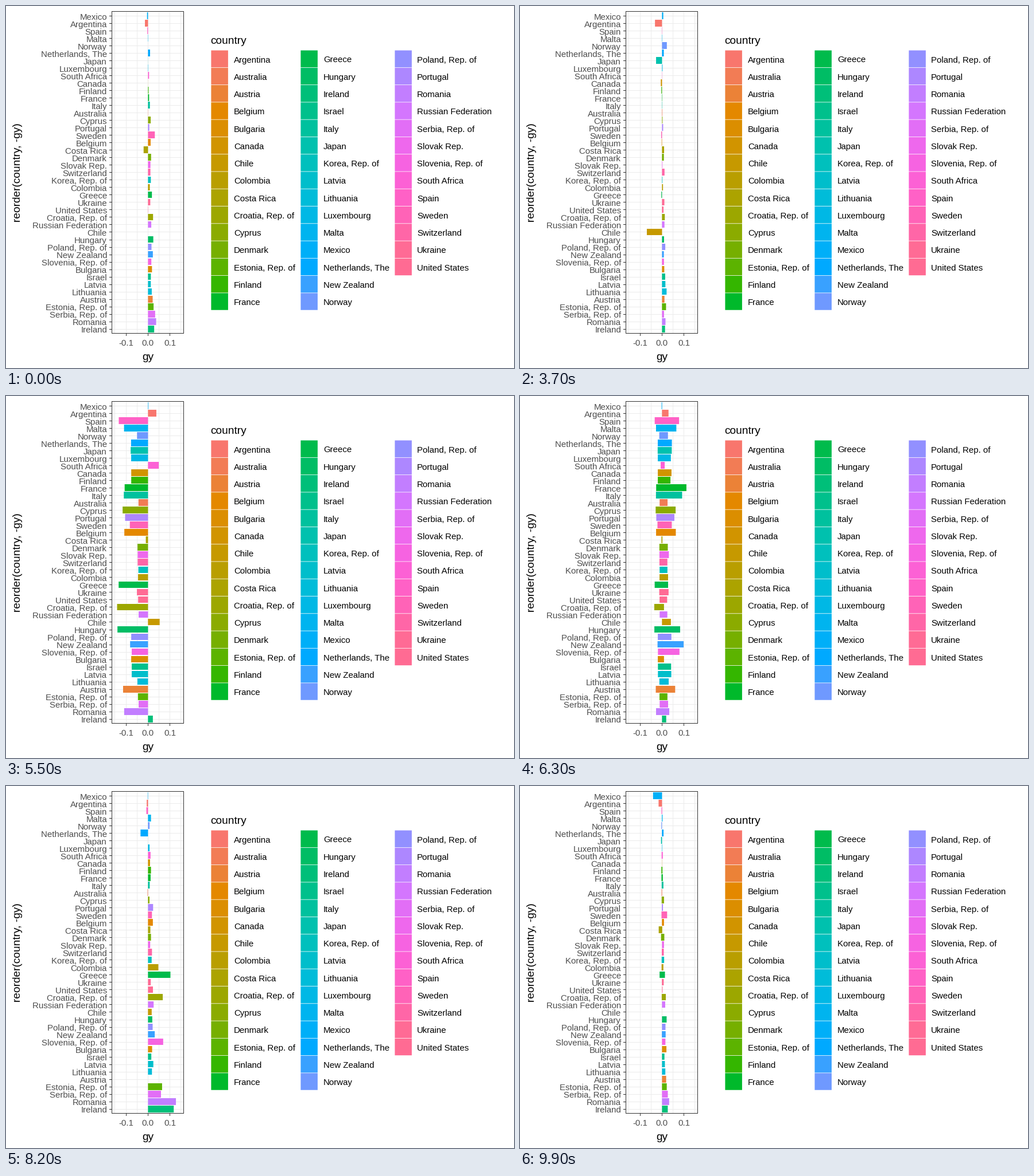
Animation of 885x632 px, one loop 10000 ms. Source, as a matplotlib script:

```python
import numpy as np
import matplotlib.pyplot as plt
from matplotlib.animation import FuncAnimation
from matplotlib.collections import LineCollection, PolyCollection
from matplotlib.patches import Rectangle

W, H, DPI = 885, 632, 100
FRAMES, INTERVAL = 100, 100
LEFT, RIGHT, TOP, BOTTOM = 184.5, 309.5, 9.5, 571.5
ZERO, SCALE = 247.4, 0.383          # pixels; pixels per 0.001 of growth
ROW0, ROW_STEP, BAR_HALF = 17.5, 13.017, 5.86
KEY_TOP, KEY_STEP = 77, 30.27
INK, AXIS_INK, GRID, BORDER = "black", "#4D4D4D", "#EBEBEB", "#333333"

countries = """Mexico|Argentina|Spain|Malta|Norway|Netherlands, The|Japan|Luxembourg
South Africa|Canada|Finland|France|Italy|Australia|Cyprus|Portugal|Sweden|Belgium
Costa Rica|Denmark|Slovak Rep.|Switzerland|Korea, Rep. of|Colombia|Greece|Ukraine
United States|Croatia, Rep. of|Russian Federation|Chile|Hungary|Poland, Rep. of
New Zealand|Slovenia, Rep. of|Bulgaria|Israel|Latvia|Lithuania|Austria
Estonia, Rep. of|Serbia, Rep. of|Romania|Ireland""".replace("\n", "|").split("|")
names = sorted(countries)
N = len(countries)
rng = np.random.default_rng(4)


def quarter(base, spread=4, **notable):
    """Growth in thousandths: a base with noise, and a few countries that stand out."""
    values = base + rng.normal(0, spread, N)
    for i, name in enumerate(countries):
        key = name.split(",")[0].replace(" ", "")
        values[i] = notable.get(key, values[i])
    return values


def trend(top, bottom):
    return np.linspace(top, bottom, N)


# The slump comes in four depths.
deepest = "Spain Greece Croatia Hungary"
deep = "Malta France Italy Cyprus Portugal Belgium Austria Romania"
mild = """Norway Australia Denmark Slovak Switzerland Korea Colombia Ukraine United
Russian Lithuania Estonia Serbia"""


def depth(name):
    first = name.replace(",", "").split()[0]
    for group, value in ((deepest, -138), (deep, -111), (mild, -45)):
        if first in group.split():
            return value
    return -77


slump = quarter(np.array([depth(c) for c in countries]), 3, Mexico=2, Argentina=38,
                SouthAfrica=49, CostaRica=-10, Chile=53, Ireland=22)
quarters = [
    quarter(trend(-2, 24), Argentina=-14, Sweden=31, CostaRica=-20, Chile=0,
            UnitedStates=1, Romania=37),
    quarter(trend(0, 8), Romania=35),
    quarter(trend(-4, 4), 8, Mexico=-20, Finland=-27, RussianFederation=22,
            Bulgaria=-29, Romania=-26, Ireland=17),
    quarter(trend(0, 8)),
    quarter(trend(-3, 13), 5, Argentina=-32, Norway=22, Japan=-27, Chile=-69),
    quarter(trend(-12, 0), Ireland=88),
    slump,
    quarter(0.75 * abs(slump), SouthAfrica=-8, France=148, Italy=122, Greece=37, Croatia=12,
            NewZealand=131, Slovenia=106, Bulgaria=12, Romania=44),
    quarter(trend(0, 15)),
    quarter(trend(7, 26), 6, Netherlands=-34, Colombia=47, Greece=102, Croatia=67,
            Slovenia=69, Austria=0, Estonia=64, Serbia=59, Romania=127, Ireland=117),
    quarter(trend(-8, 14), 8, Mexico=-150, Greece=-44),
]
growth = SCALE * np.array(quarters + quarters[:1])
lows, highs = np.minimum(growth, 0), np.maximum(growth, 0)

# Each quarter is reached at an arrival frame and held for a while.
arrivals = np.array([0, 9, 19, *range(28, FRAMES + 1, 9)])
leaves = arrivals[:-1] + 5
leaves[0] = 4
knots = np.sort(np.append(arrivals, leaves))
stages = np.repeat(np.arange(len(arrivals)), 2)[:-1]


def hcl(hue, chroma=100, lum=65):
    """Polar LUV colour to sRGB."""
    h = np.radians(hue)
    y = ((lum + 16) / 116) ** 3
    u = chroma * np.cos(h) / (13 * lum) + 0.19784
    v = chroma * np.sin(h) / (13 * lum) + 0.46834
    x, z = 9 * y * u / (4 * v), y * (12 - 3 * u - 20 * v) / (4 * v)
    rgb = np.array([3.2405 * x - 1.5371 * y - 0.4985 * z,
                    -0.9693 * x + 1.8760 * y + 0.0416 * z,
                    0.0556 * x - 0.2040 * y + 1.0572 * z])
    rgb = np.clip(rgb, 0, 1)
    return tuple(np.clip(np.where(rgb > 0.00304, 1.055 * rgb ** (1 / 2.4) - 0.055,
                                  12.92 * rgb), 0, 1))


color = {name: hcl(min(15 + 360 * i / N, 359)) for i, name in enumerate(names)}

plt.rcParams["font.family"] = "Liberation Sans"
fig = plt.figure(figsize=(W / DPI, H / DPI), dpi=DPI, facecolor="white")
ax = fig.add_axes([0, 0, 1, 1])
ax.set(xlim=(0, W), ylim=(H, 0))
ax.axis("off")


def label(x, y, text, px=15, ink=INK, ha="left", **kw):
    ax.text(x, y, text, size=px * 72 / DPI, color=ink, ha=ha, va="baseline", **kw)


def lines(segments, ink, z):
    """One-pixel lines, unsnapped so that they stay on pixel centres."""
    ax.add_collection(LineCollection(segments, colors=ink, linewidths=72 / DPI,
                                     zorder=z, capstyle="projecting", snap=False))


def pixel_centre(values):
    return np.floor(values) + 0.5


rows = ROW0 + ROW_STEP * np.arange(N)
row_lines = pixel_centre(rows)
ticks = ZERO + 100 * SCALE * np.array([-1, 0, 1])
tick_lines = pixel_centre(ticks)
columns = pixel_centre(ZERO + 50 * SCALE * np.arange(-3, 4))

lines([[(x, TOP), (x, BOTTOM)] for x in columns], GRID, 1)
lines([[(LEFT, y), (RIGHT, y)] for y in row_lines], GRID, 1)
lines([[(LEFT - 4, y), (LEFT, y)] for y in row_lines], BORDER, 3)
lines([[(x, BOTTOM), (x, BOTTOM + 4)] for x in tick_lines], BORDER, 3)
lines([[(LEFT, TOP), (RIGHT, TOP), (RIGHT, BOTTOM), (LEFT, BOTTOM), (LEFT, TOP)]], BORDER, 4)

for y, name in zip(rows, countries):
    label(176, y + 6, name, ink=AXIS_INK, ha="right")
for x, text in zip(ticks, ("-0.1", "0.0", "0.1")):
    label(x, 593, text, ink=AXIS_INK, ha="center")
label(247, 618.5, "gy", 19.2, ha="center")
label(25.5, 291, "reorder(country, -gy)", 19.2, ha="center", rotation=90,
      rotation_mode="anchor")

# Legend
label(356.5, 66, "country", 19.2)
for i, name in enumerate(names):
    col, row = divmod(i, 15)
    x, y = (357, 513, 677)[col], KEY_TOP + KEY_STEP * row
    ax.add_patch(Rectangle((x + 0.4, y + 0.5), 29.5, KEY_STEP - 0.8, fc=color[name],
                           lw=0, snap=False))
    label((397, 553, 716)[col], y + 21.5, name)

bars = PolyCollection([], facecolors=[color[c] for c in countries], linewidths=0,
                      zorder=2, snap=False)
ax.add_collection(bars, autolim=False)
bar_tops, bar_bottoms = np.floor(rows - BAR_HALF), np.floor(rows + BAR_HALF)


def update(frame):
    stage = np.interp(frame, knots, stages)
    k = min(int(stage), len(growth) - 2)
    t = stage - k
    left = ZERO + lows[k] * (1 - t) + lows[k + 1] * t
    right = ZERO + highs[k] * (1 - t) + highs[k + 1] * t
    bars.set_verts([[(a, top), (b, top), (b, bottom), (a, bottom)]
                    for a, b, top, bottom in zip(left, right, bar_tops, bar_bottoms)])
    return [bars]


anim = FuncAnimation(fig, update, frames=FRAMES, interval=INTERVAL, repeat=True,
                     repeat_delay=0, blit=False)
plt.show()
```
